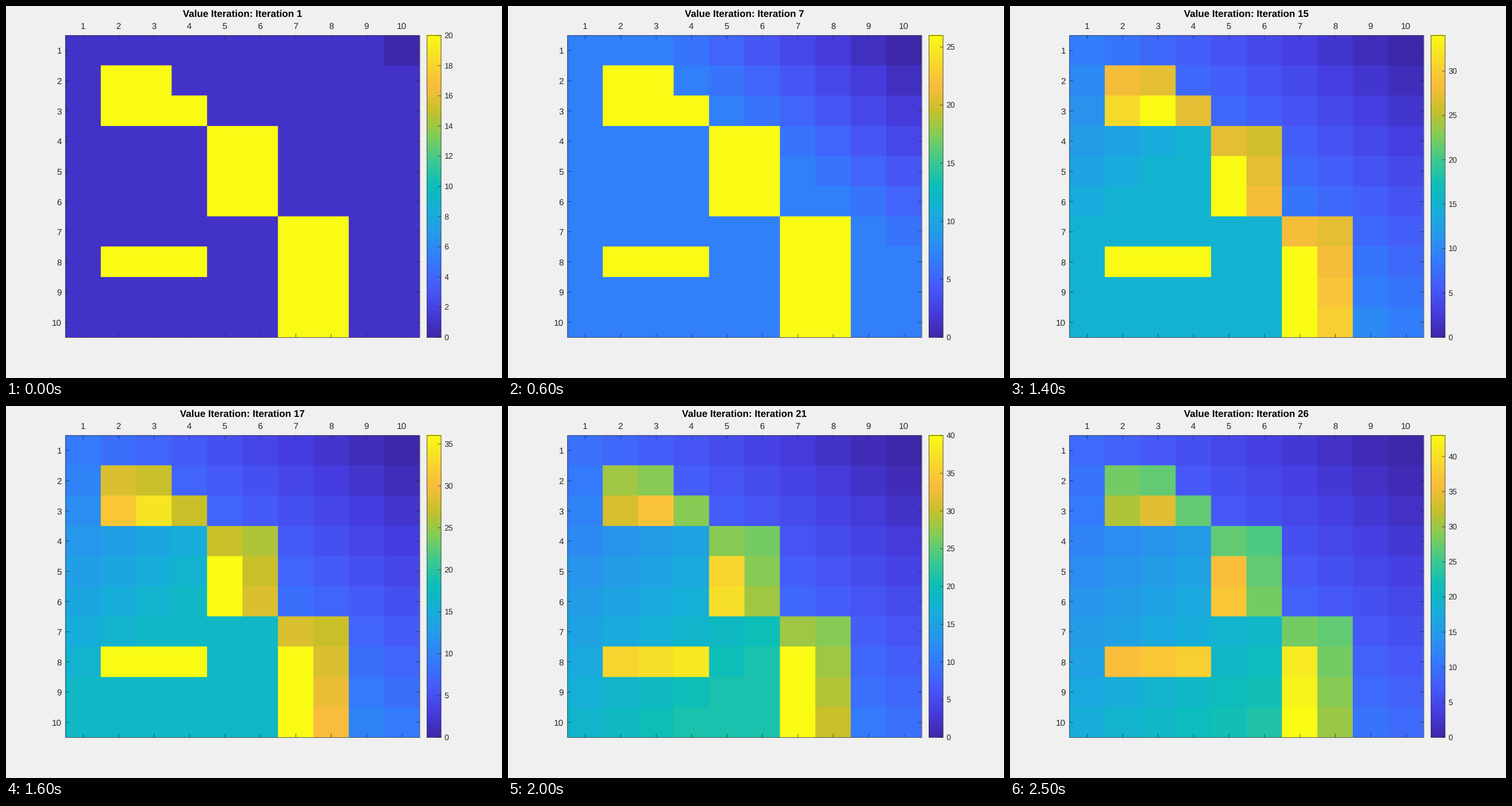
A matplotlib script that plays this animation: 864 px wide and 648 px high, repeating every 2600 ms.

```python
import numpy as np
import matplotlib.pyplot as plt
from matplotlib.animation import FuncAnimation
from matplotlib.colors import LinearSegmentedColormap

STAGE_W, STAGE_H, DPI = 864, 648, 72
W, H = 1120, 840               # layout units; one unit is a hairline
SCALE = STAGE_W / W
N, FRAMES = 10, 26
LEFT, RIGHT, TOP, BOTTOM = 134, 934, 66, 748
BAR_LEFT, BAR_RIGHT = 950, 982
TICK, BAR_TICK, MAX_TICKS = 8, 7, 13
INK, PAPER = "#262626", 240 / 255

plt.rcParams.update({"font.family": "Liberation Sans", "text.hinting": "none"})

CMAP = LinearSegmentedColormap.from_list("heat", [
    "#3e26a8", "#463de0", "#475bf9", "#347afd", "#2797eb", "#17aeda", "#0cbeb9",
    "#3dc990", "#81cc59", "#c8c129", "#fbbc3d", "#f7db2b", "#f9fb15"])


def step_costs():
    cost = np.ones((N, N))
    cost[1, 1:3] = cost[2, 1:4] = cost[7, 1:4] = 20
    cost[3:6, 4:6] = cost[6:, 6:8] = 20
    return cost


def value_iterations():
    cost, value, history = step_costs(), np.zeros((N, N)), []
    for _ in range(FRAMES):
        p = np.pad(value, 1, constant_values=np.inf)
        value = cost + np.minimum.reduce([p[:-2, 1:-1], p[2:, 1:-1], p[1:-1, :-2], p[1:-1, 2:]])
        value[0, -1] = 0
        history.append(value)
    return history


def coverage(start, stop, size):
    """Share of each pixel (row) that lies in each of the N cells (column)."""
    edges = np.round(np.linspace(start, stop, N + 1)) * SCALE
    pixel = np.arange(size)[:, None]
    return np.clip(np.minimum(pixel + 1, edges[1:]) - np.maximum(pixel, edges[:-1]), 0, 1)


HISTORY = value_iterations()
COVER_X = coverage(LEFT, RIGHT, STAGE_W)
COVER_Y = coverage(TOP, BOTTOM, STAGE_H)


def heat_image(value):
    colors = CMAP(value / value.max())[..., :3] - PAPER
    return PAPER + np.einsum("yi,ijc,xj->yxc", COVER_Y, colors, COVER_X, optimize=True)


fig = plt.figure(figsize=(STAGE_W / DPI, STAGE_H / DPI), dpi=DPI, facecolor=str(PAPER))
ax = fig.add_axes([0, 0, 1, 1])
ax.set_axis_off()


def line(xs, ys):
    return ax.plot(np.add(xs, 0.5), np.add(ys, 0.5), color=INK, lw=SCALE, snap=False,
                   solid_capstyle="butt", solid_joinstyle="miter", zorder=3)[0]


def box(x0, y0, x1, y1):
    line([x0, x1, x1, x0, x0], [y0, y0, y1, y1, y0])


def label(x, y, text, size, ha, **style):
    return ax.text(x, y, text, fontsize=size * SCALE, ha=ha, va="baseline",
                   **{"color": INK, **style})


cells = ax.imshow(heat_image(HISTORY[0]), extent=(0, W, H, 0), aspect="auto",
                  interpolation="nearest")
ax.imshow(np.linspace(1, 0, 256)[:, None], cmap=CMAP, aspect="auto",
          interpolation="nearest", extent=(BAR_LEFT, BAR_RIGHT, BOTTOM, TOP))
ax.set(xlim=(0, W), ylim=(H, 0))

box(LEFT, TOP, RIGHT, BOTTOM)
box(BAR_LEFT, TOP, BAR_RIGHT, BOTTOM)

for i in range(N):
    x = LEFT + (RIGHT - LEFT) * (i + 0.5) / N
    y = TOP + (BOTTOM - TOP) * (i + 0.5) / N
    for edge, inward in ((TOP, TICK), (BOTTOM, -TICK)):
        line([x, x], [edge, edge + inward])
    for edge, inward in ((LEFT, TICK), (RIGHT, -TICK)):
        line([edge, edge + inward], [y, y])
    label(x, 52, str(i + 1), 20, "center")
    label(126, y + 8, str(i + 1), 20, "right")

title = label(534, 25, "", 22, "center", weight="bold", color="black")
bar_ticks = [line([BAR_RIGHT - BAR_TICK, BAR_RIGHT], [0, 0]) for _ in range(MAX_TICKS)]
bar_labels = [label(990, 0, "", 18, "left") for _ in range(MAX_TICKS)]


def draw(frame):
    value = HISTORY[frame]
    top = value.max()
    step = 2 if top <= 23 else 5
    cells.set_data(heat_image(value))
    title.set_text(f"Value Iteration: Iteration {frame + 1}")
    for i, (tick, text) in enumerate(zip(bar_ticks, bar_labels)):
        shown = i * step <= top
        tick.set_visible(shown)
        text.set_visible(shown)
        if shown:
            y = BOTTOM - (BOTTOM - TOP) * i * step / top
            tick.set_ydata([y + 0.5] * 2)
            text.set_y(y + 6.5)
            text.set_text(str(i * step))
    return [cells, title, *bar_ticks, *bar_labels]


anim = FuncAnimation(fig, draw, frames=FRAMES, interval=100, repeat=True,
                     repeat_delay=0, blit=False)
plt.show()
```
